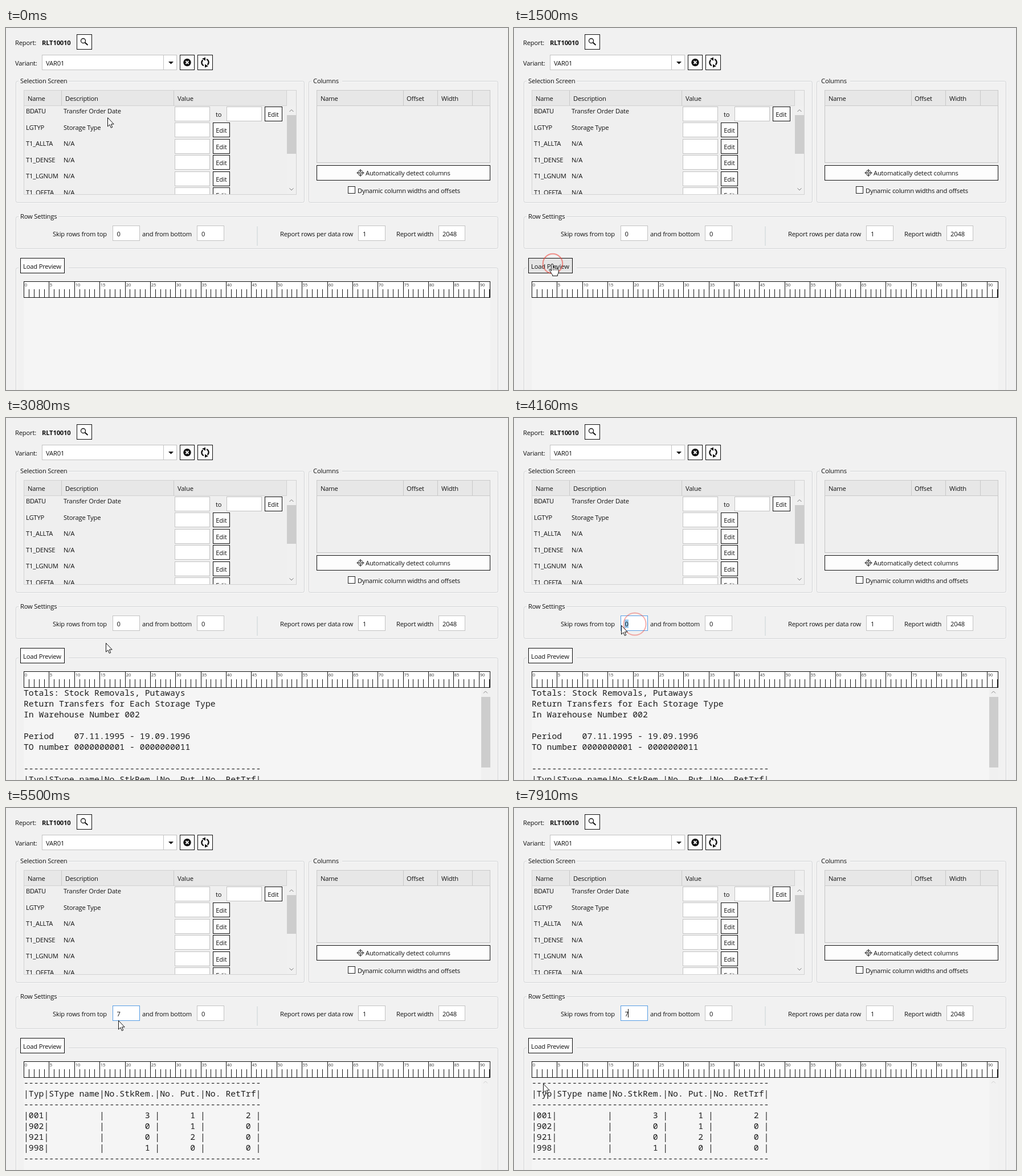
Write an HTML page that moves like this. It is 881x636 px and loops after 8 s.

```html
<!DOCTYPE html>
<html lang="en">
<head>
<meta charset="utf-8">
<title>Report settings</title>
<style>
  html, body { margin: 0; width: 100%; height: 100%; overflow: hidden; background: #f1f1f1; }
  svg { display: block; width: 881px; height: 636px; }
  text { font: 11.2px "Open Sans", sans-serif; letter-spacing: -.18px; fill: #111; white-space: pre; }
  .bold { font-weight: 700; }
  .mono { font: 14.78px "Noto Sans Mono", monospace; letter-spacing: 0; fill: #1c1c1c; }
  .tiny { font-size: 7.5px; letter-spacing: 0; fill: #333; }
</style>
</head>
<body>
<svg id="stage" viewBox="0 0 881 636" xmlns="http://www.w3.org/2000/svg"></svg>
<script>
const BG = '#f1f1f1', INK = '#111', EDGE = '#c3c3c3', LOOP = 8000, STEP = 1000 / 12;
const PITCH = 8.876;
const $ = id => document.getElementById(id);

// Drawing helpers; boxes are given by their outer pixel edges.
const fill = (x, y, w, h, c, extra = '') =>
  `<rect x="${x}" y="${y}" width="${w}" height="${h}" fill="${c}" ${extra}/>`;
const box = (x, y, w, h, c = '#fff', edge = EDGE, extra = '') =>
  fill(x + .5, y + .5, w - 1, h - 1, c, `stroke="${edge}" ${extra}`);
const button = (x, y, w, h, extra) => box(x, y, w, h, '#fdfdfd', INK, extra);
const label = (x, y, s, cls = '') => `<text x="${x}" y="${y}" class="${cls}">${s}</text>`;
const line = (d, c = INK, w = 1, extra = '') =>
  `<path d="${d}" fill="none" stroke="${c}" stroke-width="${w}" ${extra}/>`;
const group = (x, y, w, h, title, gap) =>
  box(x + 1, y + 1, w, h, 'none', '#fbfbfb', 'rx="3"') +
  box(x, y, w, h, 'none', '#d0d2d4', 'rx="3"') +
  fill(x + 5, y - 2, gap, 6, BG) + label(x + 8, y + 4, title);

function topBar() {
  return label(16, 29.5, 'Report:') + label(63, 29.5, 'RLT10010', 'bold') +
    button(124, 11, 27, 27) +
    '<circle cx="135.5" cy="22.5" r="4" fill="none" stroke="#111" stroke-width="1.3"/>' +
    line('M138.5 25.5L143.5 30', INK, 2) +
    label(16, 66, 'Variant:') + box(63, 47, 237, 27) + line('M276.5 48V73', EDGE) +
    label(70, 66, 'VAR01') + '<path d="M285 59h9l-4.5 4.5z" fill="#111"/>' +
    button(305, 47, 26, 27) + '<circle cx="318" cy="60.5" r="6.7" fill="#111"/>' +
    line('M315.5 58l5 5m0-5l-5 5', '#fff', 1.8) +
    button(336, 47, 27, 27) +
    line('M347 66A5.5 5.5 0 0 1 345.5 56.5M352 55A5.5 5.5 0 0 1 353.5 64.5', INK, 2.3) +
    '<path d="M344 54l6-2.5v6zM355 67l-6 2.5v-6z" fill="#111"/>';
}

function selectionTable() {
  const names = ['BDATU', 'LGTYP', 'T1_ALLTA', 'T1_DENSE', 'T1_LGNUM', 'T1_OFFTA'];
  const notes = ['Transfer Order Date', 'Storage Type'];
  const rows = names.map((name, i) => {
    const y = Math.round(138 + 28.5 * i - .1), base = 150 + 28.5 * i;
    const edit = i ? 363 : 454;
    return label(35, base, name) + label(101, base, notes[i] || 'N/A') +
      box(296, y, 62, 26) +
      (i ? '' : label(368, 156, 'to') + box(387, y, 62, 26)) +
      button(edit, y, i ? 30 : 31, 26) + label(edit + 5.3, y + 18, 'Edit');
  }).join('');
  return group(17, 93, 507, 214, 'Selection Screen', 88) +
    box(31, 109, 479, 184, '#efefef', '#d2d2d2') +
    box(31, 109, 462, 28, '#e7e7e7', '#d2d2d2') +
    line('M97.5 110V136M294.5 110V136', '#c9c9c9') +
    label(38, 128, 'Name') + label(104, 128, 'Description') + label(301, 128, 'Value') +
    `<g clip-path="url(#rows)">${rows}</g>` +
    fill(493, 137, 16, 155, '#f0f0f0') + fill(493, 153, 16, 68, '#cdcdcd') +
    line('M497.5 147l3.5-3.5l3.5 3.5M497.5 281.500l3.5 3.5l3.5-3.5', '#777');
}

function columnsPanel() {
  return group(531, 93, 333, 214, 'Columns', 54) +
    box(545, 109, 305, 128, '#efefef', '#c4c4c4') +
    box(545, 109, 305, 28, '#e7e7e7', '#c9c9c9') +
    line('M697.5 110V136M757.5 110V136M818.5 110V136', '#c9c9c9') +
    label(552, 128, 'Name') + label(703, 128, 'Offset') + label(764, 128, 'Width') +
    button(545, 241, 305, 27) +
    '<circle cx="622" cy="254.500" r="4.5" fill="none" stroke="#111"/>' +
    '<circle cx="622" cy="254.500" r="1.8" fill="none" stroke="#111"/>' +
    line('M622 248v4m0 5v4M615.5 254.500h4m5 0h4') +
    label(631, 259, 'Automatically detect columns') +
    box(600, 278, 13, 13, '#fff', '#222') +
    label(617, 290, 'Dynamic column widths and offsets');
}

function rowSettings() {
  return group(17, 331, 847, 57, 'Row Settings', 70) +
    label(82, 366, 'Skip rows from top') + box(187, 347, 48, 27, '#fff', EDGE, 'id="field"') +
    fill(194, 354, 7, 15, '#99c9ef', 'id="mark"') +
    '<text id="skip" x="194.500" y="366">0</text>' +
    line('M200.5 353V368', INK, 1, 'id="caret"') +
    label(239, 366, 'and from bottom') + box(335, 347, 48, 27) + label(343, 366, '0') +
    line('M441 349V382', '#9fb4b8', 1, 'stroke-dasharray="1 1"') +
    label(481, 366, 'Report rows per data row') + box(618, 347, 48, 27) + label(626, 366, '1') +
    label(685, 366, 'Report width') + box(759, 347, 47, 27) + label(766, 366, '2048');
}

function ruler() {
  let out = box(31, 445, 819, 29, '#fff', INK);
  for (let i = 0; i <= 92; i++) {
    const x = Math.floor(31.5 + i * PITCH) + .5, major = i % 5 === 0;
    out += line(`M${x} ${major ? 446 : 459}V473`);
    if (major) out += label(x + 1.3, 453.5, i, 'tiny');
  }
  return out;
}

const rule = '-'.repeat(47);
const head = '|Typ|SType name|No.StkRem.|No. Put.|No. RetTrf|';
const record = (type, ...n) =>
  `|${type}|${' '.repeat(10)}|` + [10, 8, 10].map((w, i) => `${n[i]} `.padStart(w) + '|').join('');
const report = [
  'Totals: Stock Removals, Putaways', 'Return Transfers for Each Storage Type',
  'In Warehouse Number 002', '', 'Period    07.11.1995 - 19.09.1996',
  'TO number 0000000001 - 0000000011', '', rule, head, rule,
  record('001', 3, 1, 2), record('902', 0, 1, 0), record('921', 0, 2, 0), record('998', 1, 0, 0), rule
];
const page = from => report.slice(from, from + 9)
  .map((s, i) => label(31, 488 + 19 * i, s, 'mono')).join('');

function preview() {
  const up = c => line('M838 483.500l3.5-3.5l3.5 3.5', c);
  return group(17, 421, 847, 240, '', 88) +
    fill(31, 474, 819, 162, '#f5f5f5') + ruler() +
    button(25, 404, 78, 27, 'id="load"') + label(30, 423, 'Load Preview') +
    `<g id="full">${page(0)}${fill(834, 474, 16, 162, '#f0f0f0')}` +
    `${fill(834, 490, 16, 124, '#cdcdcd')}${up('#888')}</g>` +
    `<g id="cut">${page(7)}${fill(834, 474, 16, 162, '#f2f2f2')}${up('#cfcfcf')}</g>`;
}

const pointer = `
  <circle id="ring" fill="none" stroke="#ee3a30" stroke-width="2"/>
  <g id="cursor" fill="#fff" stroke="#111" stroke-linejoin="round">
    <path id="arrow" d="M.5 .5V16L4 12.700L6.300 18.300L8.700 17.300L6.400 11.900H11.200Z"/>
    <path id="hand" d="M-1.500 13V2Q-1.500 .5 0 .5T1.700 2V7.500Q2 6.500 3.500 6.700T5 8.200Q5.500 7.300 7 7.700T8.300 9.200
      Q9 8.500 10.200 9T11.200 11V15Q11 17.500 9.500 19V21.500H.5V19.500Q-1.500 17.500-2.500 15L-5 11.500
      Q-5.500 10-4.300 9.700T-2.500 11ZM1.700 7.500V12M5 8.200V12M8.300 9.200V12"/>
  </g>`;

$('stage').innerHTML =
  '<clipPath id="rows"><path d="M32 137H493V292H32Z"/></clipPath>' +
  fill(0, 0, 881, 636, BG) + topBar() + selectionTable() + columnsPanel() +
  rowSettings() + preview() + pointer;

// Pointer way: time, x, y
const way = [
  [0, 178, 157], [167, 170, 172], [333, 142, 235], [583, 92, 360], [833, 67, 414],
  [2750, 67, 414], [2917, 108, 420], [3083, 175, 395], [3333, 216, 369], [3417, 216, 369],
  [3500, 212, 362], [3750, 212, 362], [4000, 188, 364], [4833, 188, 364], [5000, 195, 364],
  [5250, 195, 364], [5500, 197, 373], [5833, 150, 440], [5917, 145, 446], [6083, 151, 448],
  [6333, 151, 449], [6667, 151, 449], [6750, 137, 449], [6917, 121, 453], [7167, 121, 453],
  [7500, 88, 467], [7917, 51, 484], [8000, 51, 484]
];
const clicks = [[910, 68, 414], [3495, 212, 362]];
const TYPED = 4745, BLINK = 525;

function pointerAt(t) {
  const i = Math.max(1, way.findIndex(p => p[0] >= t));
  const [t0, x0, y0] = way[i - 1], [t1, x1, y1] = way[i];
  const k = (t - t0) / (t1 - t0);
  return [x0 + (x1 - x0) * k, y0 + (y1 - y0) * k].map(Math.round);
}

const show = (id, on) => $(id).setAttribute('visibility', on ? 'visible' : 'hidden');

function draw(time) {
  const t = Math.min(Math.floor((time + 8) / STEP) * STEP, LOOP - 1);
  const [x, y] = pointerAt(t);
  const over = x > 25 && x < 102 && y > 404 && y < 431;
  $('cursor').setAttribute('transform', `translate(${x} ${y})`);
  show('arrow', !over);
  show('hand', over);
  $('load').setAttribute('fill', over ? '#e5e5e5' : '#fdfdfd');

  const click = clicks.find(c => t >= c[0] && t < c[0] + 920);
  show('ring', click);
  if (click) {
    const age = t - click[0], ring = $('ring');
    ring.setAttribute('cx', click[1]);
    ring.setAttribute('cy', click[2]);
    ring.setAttribute('r', age * .0292);
    ring.setAttribute('opacity', Math.min(1, 1.5 * (1 - age / 920)));
  }

  const typed = t >= TYPED;
  $('field').setAttribute('stroke', t >= 3495 ? '#569de5' : EDGE);
  $('skip').textContent = typed ? 7 : 0;
  show('mark', t >= 3910 && !typed);
  show('caret', typed && Math.floor((t - TYPED) / BLINK) % 2 === 0);
  show('full', t >= 1580 && !typed);
  show('cut', typed);
}

const start = performance.now();
function tick() {
  draw((performance.now() - start) % LOOP);
  requestAnimationFrame(tick);
}
tick();
</script>
</body>
</html>
```
